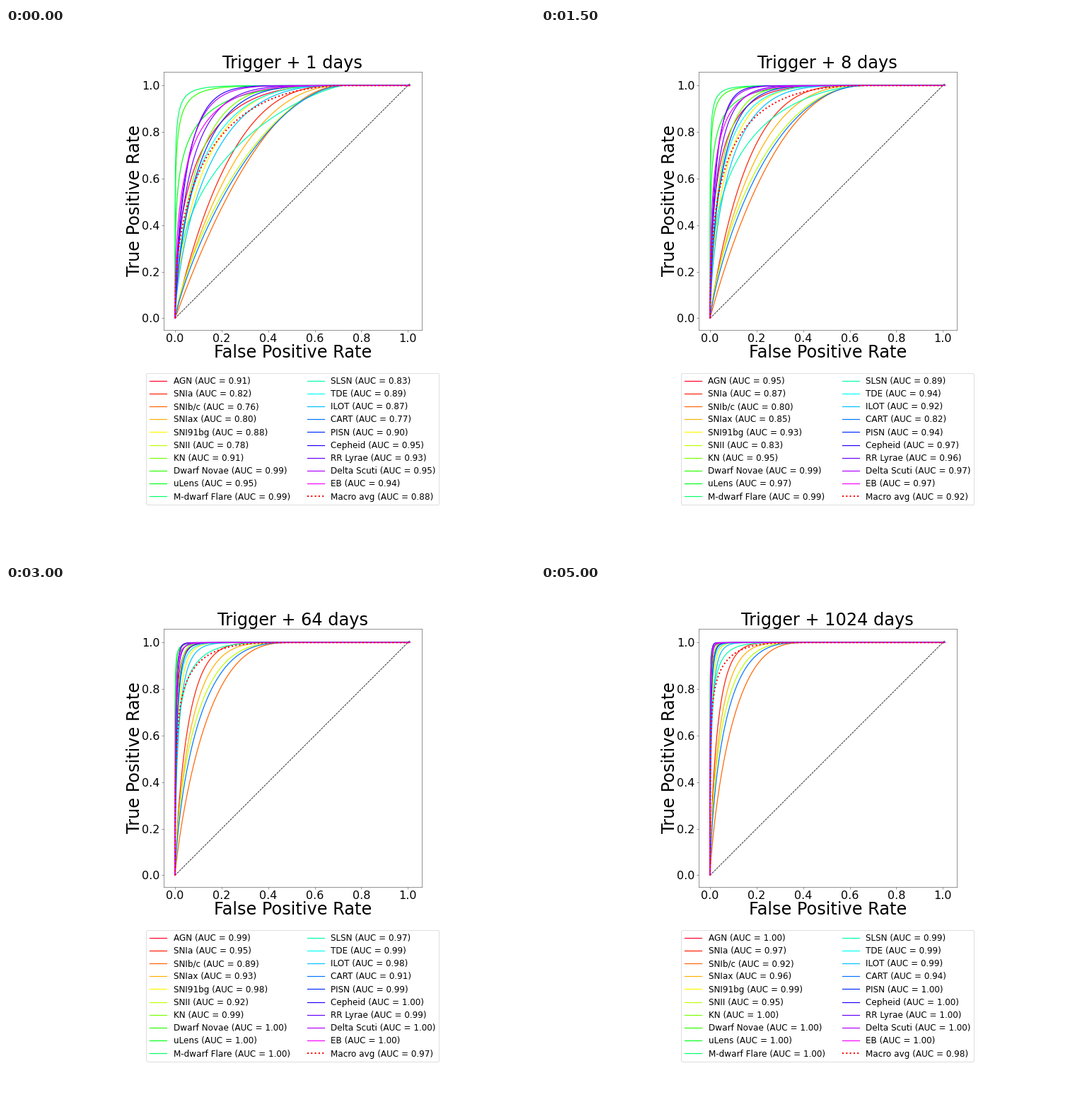
A matplotlib script that plays this animation: 748 by 748 pixels, repeating every 5500 ms.

```python
import math

import matplotlib.pyplot as plt
import numpy as np
from matplotlib.animation import FuncAnimation

SIZE = 748
STEPS = 11
STEP_MS = 500

# name: (area under the curve on day 1, steepness of the rise; lower is steeper)
CLASSES = {
    "AGN": (0.908, 0.5),
    "SNIa": (0.819, 0.95),
    "SNIb/c": (0.758, 1.0),
    "SNIax": (0.798, 0.9),
    "SNI91bg": (0.882, 0.7),
    "SNII": (0.776, 0.8),
    "KN": (0.910, 0.7),
    "Dwarf Novae": (0.986, 0.28),
    "uLens": (0.949, 0.28),
    "M-dwarf Flare": (0.992, 0.25),
    "SLSN": (0.829, 0.42),
    "TDE": (0.892, 0.6),
    "ILOT": (0.868, 0.7),
    "CART": (0.769, 0.85),
    "PISN": (0.902, 0.7),
    "Cepheid": (0.947, 0.75),
    "RR Lyrae": (0.928, 0.65),
    "Delta Scuti": (0.947, 0.65),
    "EB": (0.937, 0.45),
}
MACRO = "Macro avg"

FPR = 1.01 * np.linspace(0, 1, 600) ** 3


def progress(step):
    return 1 - math.exp(-(step / 5.5) ** 2.7)


def auc_at(name, step):
    """The area missing from 1 shrinks geometrically, good classes fastest."""
    if name == MACRO:
        return np.mean([auc_at(other, step) for other in CLASSES])
    start, rise = CLASSES[name]
    gap = 1 - start
    last_gap = 5.8 * gap ** 3 * rise + 0.001
    return 1 - gap * (last_gap / gap) ** progress(step)


def label(name, step):
    return f"{name} (AUC = {auc_at(name, step):0.2f})"


def solve_power(a, end, area):
    """Find b so that 1 - (1 - (x/end)^a)^b has the given area."""
    low, high = -4.0, 18.0
    for _ in range(60):
        mid = (low + high) / 2
        b = math.exp(mid)
        gap = end * math.exp(math.lgamma(b + 1) + math.lgamma(1 + 1 / a)
                             - math.lgamma(b + 1 + 1 / a))
        if gap > 1 - area:
            low = mid
        else:
            high = mid
    return math.exp(low)


def roc(name, step):
    t = progress(step)
    a = CLASSES[name][1] * (1 - 0.2 * t)
    end = 0.72 - 0.3 * t
    b = solve_power(a, end, auc_at(name, step))
    u = np.clip(FPR / end, 0, 1)
    return 1 - (1 - u ** a) ** b


plt.rcParams["font.family"] = "DejaVu Sans"
fig = plt.figure(figsize=(13, 13), dpi=SIZE / 13, facecolor="white")
ax = fig.add_axes([222.5 / SIZE, 1 - 427 / SIZE, 365.5 / SIZE, 365.5 / SIZE])

cmap = plt.get_cmap("gist_rainbow")
lines = {}
for i, name in enumerate(CLASSES):
    lines[name], = ax.plot(FPR, FPR, color=cmap(i / len(CLASSES)), label=label(name, 0))
lines[MACRO], = ax.plot(FPR, FPR, color="red", ls=":", lw=2.5, label=label(MACRO, 0))
ax.plot([0, 1.01], [0, 1.01], "k--", lw=1, zorder=1.5)

ax.set_xlim(-0.0505, 1.0605)
ax.set_ylim(-0.0505, 1.0605)
ticks = np.arange(6) / 5
ax.set_xticks(ticks)
ax.set_yticks(ticks)
ax.tick_params(labelsize=20, pad=2.5, color="0.35")
ax.spines[:].set_color("0.35")
ax.set_xlabel("False Positive Rate", fontsize=30, labelpad=0.5)
ax.set_ylabel("True Positive Rate", fontsize=30, labelpad=-2.5)
title = ax.set_title("", fontsize=30)
legend = ax.legend(loc="upper center", bbox_to_anchor=(0.5, -61 / 366),
                   borderaxespad=0, labelspacing=0.435, ncol=2, fontsize=15)


def draw(step):
    curves = {name: roc(name, step) for name in CLASSES}
    curves[MACRO] = np.mean(list(curves.values()), axis=0)
    for text, (name, line) in zip(legend.get_texts(), lines.items()):
        line.set_ydata(curves[name])
        text.set_text(label(name, step))
    title.set_text(f"Trigger + {2 ** step} days")
    return [*lines.values(), *legend.get_texts(), title]


anim = FuncAnimation(fig, draw, frames=STEPS, interval=STEP_MS, repeat=True,
                     repeat_delay=0, blit=False)
plt.show()
```
